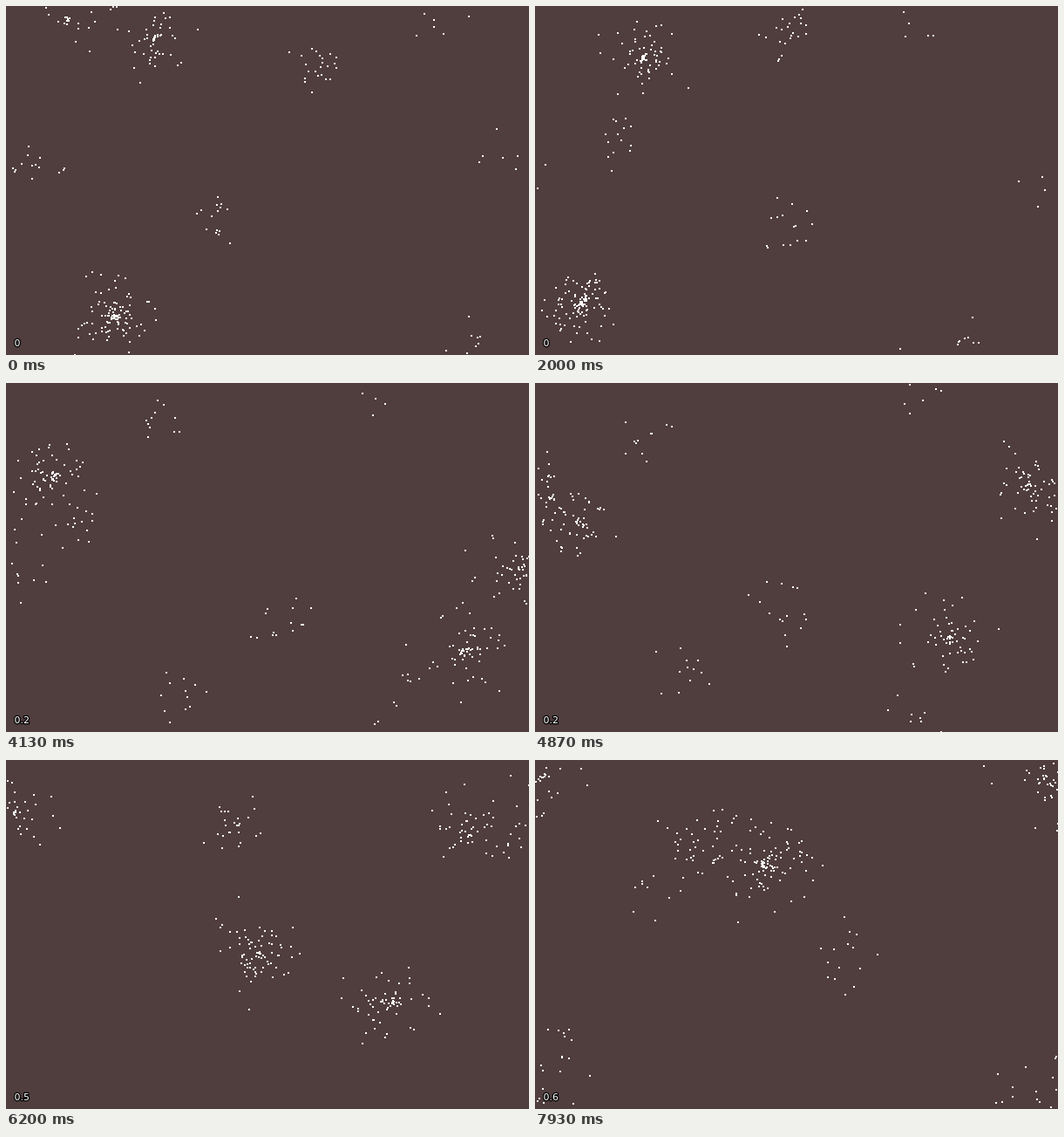
Animation, 600 px wide and 400 px high, one loop 8 s. Source, as an HTML page with a canvas:

```html
<!DOCTYPE html>
<html lang="en">
<head>
<meta charset="utf-8">
<title>Drifting swarms</title>
<style>
  html, body { margin: 0; width: 100%; height: 100%; overflow: hidden; background: #503d3d; }
  canvas { display: block; }
</style>
</head>
<body>
<canvas id="stage" width="600" height="400"></canvas>
<script>
const W = 600, H = 400, LOOP = 8000, FPS = 15;
const ctx = document.getElementById('stage').getContext('2d');

// Times in seconds of the waypoints on every path
const TIMES = [0, 0.8, 2, 3.333, 4.867, 6.2, 7.933];

// Stretches that several swarms travel together; coordinates run on past the edges and wrap
const upper = [[138, 44], [124, 58], [98, 64]];
const lower = [[125, 355], [93, 347], [52, 340]];
const middle = [[358, 68], [320, 66], [288, 25]];
const west = [[18, 130], [10, 60]];
const meet = [290, 220], heart = [262, 121], north = [265, 75];

const swarms = [
  { count: 40, path: [[168, 37], ...upper, [46, 158], meet, heart] },
  { count: 15, path: [[168, 37], ...upper, ...west, [30, -62]] },
  { count: 20, path: [[70, 14], ...upper, ...west, [8, 18]] },
  { count: 62, path: [...lower, [-18, 325], [-125, 290], [-157, 277], [-338, 121]] },
  { count: 48, path: [...lower, [14, 320], [-35, 115], [-70, 85], [-14, 18]] },
  { count: 11, path: [...middle, [248, 22], [125, 72], north, [200, 70]] },
  { count: 12, path: [...middle, [262, -25], [176, -76], [280, -175], [205, -310]] },
  { count: 6, path: [[490, 14], [465, 27], [428, 20], [378, 22], [445, 18], north, [165, 90]] },
  { count: 6, path: [[570, 170], [560, 158], [585, 212], [593, 243], [568, 118], [585, 50], [565, -45]] },
  { count: 8, path: [[540, 380], [535, 378], [485, 382], [465, 315], [442, 384], [265, 475], [122, 537]] },
  { count: 14, path: [[30, 182], [57, 160], [97, 152], [142, 175], [48, 155], meet, [178, 112]] },
  { count: 15, path: [[242, 245], [260, 242], [290, 250], [352, 285], [278, 260], meet, [352, 223]] }
];

let seed = 71;
function random() {
  seed = (seed * 16807) % 2147483647;
  return seed / 2147483647;
}

for (const swarm of swarms) {
  const dense = swarm.count > 18 || swarm.path[0] === lower[0];
  swarm.members = Array.from({ length: swarm.count }, () => ({
    radius: dense ? 54 * random() ** 1.7 : 36 * random() ** 0.9,
    angle: random() * Math.PI * 2,
    spin: (random() < 0.5 ? -1 : 1) * (0.8 + random() * 1.4),
    phase: random() * Math.PI * 2
  }));
}

// Slope of one coordinate at waypoint i
function slope(path, i, axis) {
  const a = Math.max(0, i - 1), b = Math.min(TIMES.length - 1, i + 1);
  return (path[b][axis] - path[a][axis]) / (TIMES[b] - TIMES[a]);
}

// Smooth Hermite curve through the waypoints
function along(path, t, axis) {
  let i = 0;
  while (i < TIMES.length - 2 && t >= TIMES[i + 1]) i++;
  const span = TIMES[i + 1] - TIMES[i];
  const u = Math.min(1, (t - TIMES[i]) / span), v = 1 - u;
  return v * v * (1 + 2 * u) * path[i][axis]
    + u * u * (3 - 2 * u) * path[i + 1][axis]
    + span * u * v * (v * slope(path, i, axis) - u * slope(path, i + 1, axis));
}

const wrap = (value, size) => ((Math.round(value) % size) + size) % size;

// The readout grows by a tenth at each of these seconds
const TICKS = [2.7, 4.1, 5.2, 5.7, 6.1, 7.1];

function drawReadout(t) {
  const label = String(TICKS.filter(tick => t >= tick).length / 10);
  ctx.font = '11px "DejaVu Sans", sans-serif';
  ctx.lineJoin = 'round';
  ctx.lineWidth = 2.5;
  ctx.strokeStyle = '#000';
  ctx.strokeText(label, 9.5, 390);
  ctx.fillText(label, 9.5, 390);
}

function draw(t) {
  ctx.fillStyle = '#503d3d';
  ctx.fillRect(0, 0, W, H);
  ctx.fillStyle = '#fff';
  const spread = 1 + 0.045 * t;
  for (const { path, members } of swarms) {
    const cx = along(path, t, 0), cy = along(path, t, 1);
    for (const { radius, angle, spin, phase } of members) {
      const r = radius * spread * (0.85 + 0.25 * Math.sin(1.7 * t + phase));
      const a = angle + spin * t;
      ctx.fillRect(wrap(cx + r * Math.cos(a), W), wrap(cy + r * Math.sin(a), H), 2, 2);
    }
  }
  drawReadout(t);
}

const start = performance.now();
function tick() {
  const ms = (performance.now() - start) % LOOP;
  const step = Math.min(LOOP * FPS / 1000 - 1, Math.floor((ms + 4) * FPS / 1000));
  draw(step / FPS);
  requestAnimationFrame(tick);
}
tick();
</script>
</body>
</html>
```
